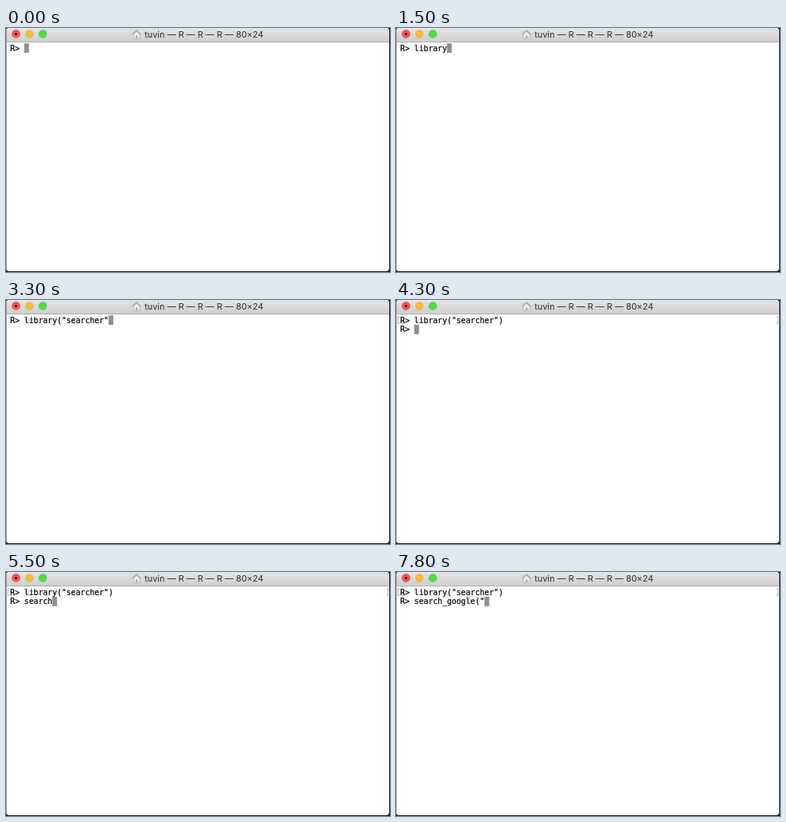
Animation of 480 by 305 pixels, one loop 8 s. Source, as an HTML page:

```html
<!DOCTYPE html>
<html lang="en">
<head>
<meta charset="utf-8">
<title>Terminal</title>
<style>
  html, body { margin: 0; width: 100%; height: 100%; overflow: hidden; background: #fff; }
  svg { display: block; width: 480px; height: 305px; }
  .title { font: 10.9px Inter, Roboto, sans-serif; fill: #2b2a2b; text-anchor: middle; }
  .line { font: 9.73px "DejaVu Sans Mono", monospace; fill: #000; stroke: #000; stroke-width: .2px; white-space: pre; }
  .mark { fill: none; stroke: #b4b4b4; }
</style>
</head>
<body>
<svg viewBox="0 0 480 305">
  <defs>
    <linearGradient id="bar" x2="0" y2="1">
      <stop offset="0" stop-color="#e6e4e6"/>
      <stop offset="1" stop-color="#d0ced0"/>
    </linearGradient>
    <clipPath id="window"><rect width="479" height="304" rx="4"/></clipPath>
  </defs>
  <rect width="480" height="305" fill="#1c1c1c"/>
  <g clip-path="url(#window)">
    <rect width="480" height="305" fill="#fff"/>
    <rect width="480" height="17" fill="url(#bar)"/>
    <path d="M0 17.5H480" stroke="#b0aeb0"/>
    <path d="M.5 0V305" stroke="#9a9a9a"/>
  </g>

  <g stroke-width=".5">
    <circle cx="12.5" cy="7.5" r="5.1" fill="#ea5452" stroke="#dd4c49"/>
    <circle cx="12.5" cy="7.5" r="1.6" fill="#4c0d0b"/>
    <circle cx="29.2" cy="7.5" r="5.1" fill="#f0bb42" stroke="#e4b04a"/>
    <circle cx="46" cy="7.5" r="5.1" fill="#50d853" stroke="#52c956"/>
  </g>

  <g>
    <path d="M159.5 8L163.3 4.3L167 8V13.3H159.5Z" fill="#f0eeec" stroke="#b5b0ac" stroke-width=".7"/>
    <path d="M157.6 8.3L163.3 2.8L169 8.3" fill="none" stroke="#a9a29e" stroke-width="1.3"/>
    <path d="M162 13.3V9.2H164.6V13.3Z" fill="#b9b0a8"/>
  </g>
  <text class="title" x="247.5" y="11.6">tuvin — R — R — R — 80×24</text>

  <rect id="cursor" width="6" height="11.8" fill="#8f8f8f"/>
  <text class="line" x="5.3" y="28.8"></text>
  <text class="line" x="5.3" y="40.4"></text>
  <path id="brackets" class="mark" d="M4.5 20.5H2.5V29.5H4.5M475.5 20.5H477.5V29.5H475.5"/>
</svg>
<script>
  const LOOP = 8000, ENTER = 3900, CELL = 5.86, LEFT = 5.1, PROMPT = 'R> ';
  // Each command with the time (in 100 ms) at which every key lands.
  const commands = [
    { text: 'library("searcher")',
      keys: [2, 4, 6, 8, 10, 11, 13, 16, 18, 20, 22, 23, 25, 27, 28, 30, 31, 33, 35] },
    { text: 'search_google("',
      keys: [45, 48, 50, 51, 53, 55, 57, 59, 61, 62, 64, 65, 68, 71, 75] }
  ];
  const lines = document.querySelectorAll('.line');
  const cursor = document.getElementById('cursor');
  const brackets = document.getElementById('brackets');

  function typed({ text, keys }, t) {
    return PROMPT + text.slice(0, keys.filter(k => k * 100 <= t).length);
  }

  function draw(t) {
    const row = t >= ENTER ? 1 : 0;
    const shown = commands.map((c, i) => i <= row ? typed(c, t) : '');
    shown.forEach((s, i) => {
      if (lines[i].textContent !== s) lines[i].textContent = s;
    });
    cursor.setAttribute('x', LEFT + shown[row].length * CELL);
    cursor.setAttribute('y', 19.2 + row * 11.7);
    brackets.style.visibility = row ? 'visible' : 'hidden';
  }

  const start = performance.now();
  function tick() {
    draw((performance.now() - start) % LOOP);
    requestAnimationFrame(tick);
  }
  tick();
</script>
</body>
</html>
```
